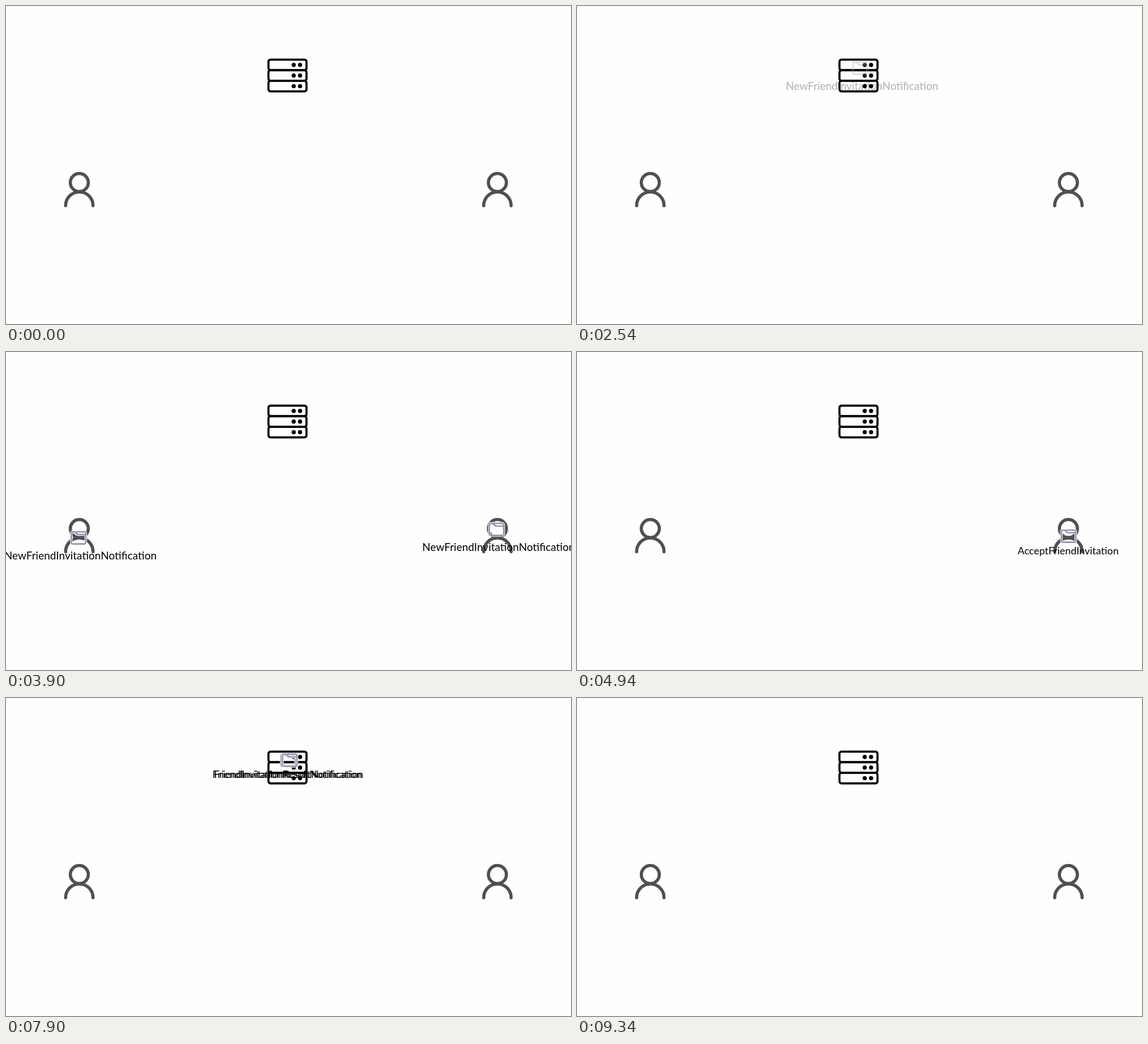
These frames come from a looping animation (998x561 px, 9380 ms). An HTML page:

```html
<!DOCTYPE html>
<html lang="en">
<head>
<meta charset="utf-8">
<title>Friend invitation flow</title>
<style>
  html, body { margin: 0; width: 100%; height: 100%; overflow: hidden; background: #fefefe; }
  svg { display: block; width: 998px; height: 561px; overflow: hidden; }
  text { font-family: Lato, "Open Sans", sans-serif; text-anchor: middle; fill: #000; }
</style>
</head>
<body>
<svg id="stage" viewBox="0 0 998 561" fill="none">
  <defs>
    <g id="user" stroke="#505052" stroke-width="5.6" stroke-linecap="round">
      <circle cy="311.4" r="15.9"/>
      <path d="M-24.2 352.2a24.2 24.2 0 0 1 48.4 0"/>
    </g>
    <g id="unit">
      <rect x="463.6" y="94.6" width="67.2" height="18.6" rx="3.6" stroke="#000" stroke-width="3.7"/>
      <circle cx="508.2" cy="104" r="3.7" fill="#000"/>
      <circle cx="519.4" cy="104" r="3.7" fill="#000"/>
    </g>
    <path id="outline" stroke-linejoin="round" stroke-linecap="round"
      d="M-10.5 1.3H-7L-1.5 6H12.6M-4 1.3H10.3a2.4 2.4 0 0 1 2.4 2.4V20.2a2.4 2.4 0 0 1-2.4 2.4H-10.3a2.4 2.4 0 0 1-2.4-2.4V3.7a2.4 2.4 0 0 1 2.4-2.4"/>
    <g id="folder">
      <use href="#outline" stroke="#fefefe" stroke-width="4.4"/>
      <use href="#outline" stroke="#9692ad" stroke-width="2.6"/>
    </g>
  </defs>
  <use href="#unit"/>
  <use href="#unit" y="18.7"/>
  <use href="#unit" y="37.4"/>
  <use href="#user" x="129.5"/>
  <use href="#user" x="868"/>
</svg>
<script>
const LOOP = 9380, STEP = 40, MOVE = 945, FADE = 500;

// stretches of motion; the picture rests between them
const spans = [[0, 520], [1020, 4940], [5440, 7400], [7900, 9340]];

// text x / baseline, folder x / top, travel per copy, start times
const messages = [
  { text: "InviteFriend", size: 16.8, x: 131.5, y: 281, fx: 132, fy: 238,
    paths: [[367, -139]], show: -10, go: 980, hide: 1960 },
  { text: "NewFriendInvitationNotification", size: 19, x: 503.5, y: 148.3, fx: 500, fy: 98,
    paths: [[-372, 218], [366.5, 203]], show: 2460, go: 2960, hide: 3940 },
  { text: "AcceptFriendInvitation", size: 17.9, x: 867.5, y: 357, fx: 868.3, fy: 313,
    paths: [[-364, -213]], show: 4440, go: 5400, hide: 6380 },
  { text: "FriendInvitationResultNotification", size: 17.8, x: 498, y: 140.6, fx: 500, fy: 97,
    paths: [[-364, 228], [370, 228]], show: 6900, go: 7860, hide: 8840 }
];

const stage = document.getElementById("stage");

function add(parent, tag, attrs) {
  const node = document.createElementNS("http://www.w3.org/2000/svg", tag);
  for (const key in attrs) node.setAttribute(key, attrs[key]);
  return parent.appendChild(node);
}

const copies = messages.flatMap(m => m.paths.map(([dx, dy]) => {
  const node = add(stage, "g", { opacity: 0 });
  add(node, "use", { href: "#folder", x: m.fx, y: m.fy });
  add(node, "text", { x: m.x, y: m.y, "font-size": m.size }).textContent = m.text;
  return { node, dx, dy, show: m.show, go: m.go, hide: m.hide };
}));

const part = (t, start, length) => Math.min(1, Math.max(0, (t - start) / length));
const ease = p => p < 0.5 ? 2 * p * p : 1 - 2 * (1 - p) ** 2;

function snap(t) {
  const [start, end] = spans.findLast(s => s[0] <= t);
  return Math.min(end, start + Math.floor((t - start) / STEP) * STEP);
}

function draw(t) {
  for (const c of copies) {
    const p = ease(part(t, c.go, MOVE));
    const shown = t > 0 ? part(t, c.show, FADE) : 0;
    c.node.setAttribute("opacity", shown * (1 - part(t, c.hide, FADE)));
    c.node.setAttribute("transform", `translate(${c.dx * p} ${c.dy * p})`);
  }
}

const began = performance.now();
function tick() {
  draw(snap((performance.now() - began) % LOOP));
  requestAnimationFrame(tick);
}
tick();
</script>
</body>
</html>
```
